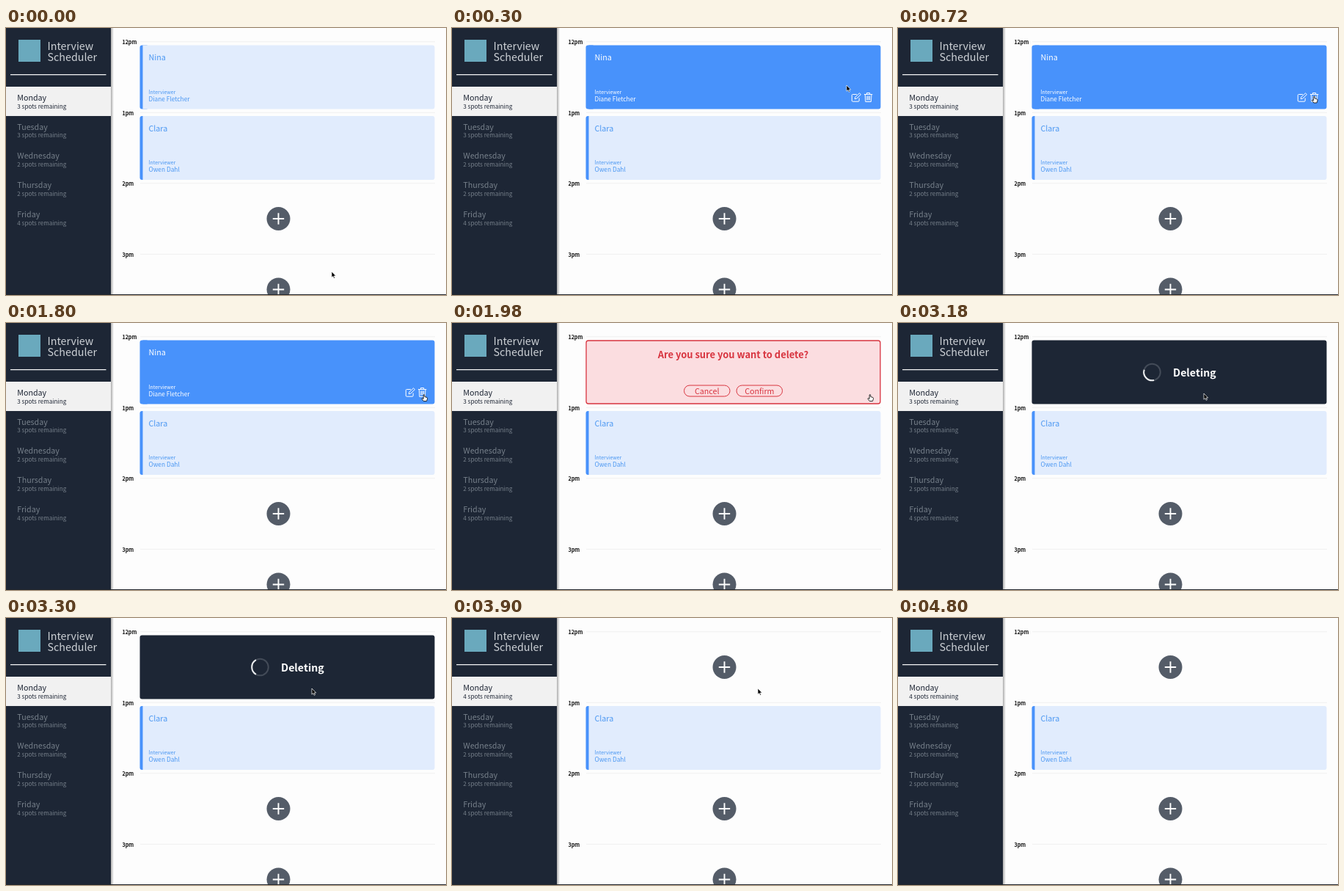
Write an HTML page that moves like this. It is 600x364 px and loops after 4.98 s.

```html
<!DOCTYPE html>
<html lang="en">
<head>
<meta charset="utf-8">
<title>Interview Scheduler</title>
<style>
html, body { margin: 0; height: 100%; overflow: hidden; background: #fdfdfd; }
svg { display: block; width: 600px; height: 364px; }
text { font-family: "Noto Sans CJK JP", "Noto Sans CJK SC", "Noto Sans", sans-serif; font-size: 10.7px; }
.logo { font-size: 14.3px; font-weight: 300; fill: #cdd1d6; }
.day { fill: #77808b; }
.active { fill: #1c2433; }
.spots { font-size: 8.1px; font-weight: 300; }
.time { font-size: 7.2px; font-weight: 700; fill: #111; }
.label { font-size: 6.9px; font-weight: 300; }
.person { font-size: 8.35px; }
.card { fill: #4a97f2; }
.card .bg { fill: #e1ecfd; }
.card .icons { display: none; fill: none; stroke: #fff; }
.hover { fill: #fff; }
.hover .bg { fill: #4892fb; }
.hover .icons { display: inline; }
.confirm { fill: #d8343f; text-anchor: middle; }
.confirm rect { stroke: #d8343f; fill: #fbdde0; }
.question { font-size: 12.9px; font-weight: 700; }
.deleting { font-size: 14.2px; font-weight: 700; fill: #fff; }
</style>
</head>
<body>
<svg viewBox="0 0 600 364">
  <defs>
    <linearGradient id="shade">
      <stop stop-color="#000" stop-opacity=".32"/>
      <stop offset="1" stop-color="#000" stop-opacity="0"/>
    </linearGradient>
    <g id="plus">
      <circle r="16" fill="#545c68"/>
      <path d="M-7.7 0H7.7M0-7.7V7.7" stroke="#fff" stroke-width="1.9"/>
    </g>
  </defs>
  <rect width="600" height="364" fill="#fdfdfd"/>
  <rect x="143" width="4" height="364" fill="url(#shade)"/>
  <rect width="143" height="364" fill="#1d2635"/>
  <rect x="17" y="16" width="30" height="30" fill="#6aa9bd"/>
  <text class="logo" x="56.5" y="30.3">Interview</text>
  <text class="logo" x="56.5" y="44.8">Scheduler</text>
  <path d="M6 63.6H136.5" stroke="#f4f5f6" stroke-width="1.3"/>
  <rect y="80" width="143" height="40" fill="#f1f1f1"/>
  <g id="days"></g>
  <g id="hours"></g>
  <g id="cards"></g>

  <g id="confirm" class="confirm">
    <rect x="183" y="24" width="401" height="86" rx="3" stroke-width="1.3"/>
    <text class="question" x="383.5" y="48.3">Are you sure you want to delete?</text>
    <rect x="316.5" y="85" width="62.5" height="15" rx="7.5"/>
    <rect x="388" y="85" width="62.5" height="15" rx="7.5"/>
    <text x="347.7" y="96.6">Cancel</text>
    <text x="419.3" y="96.6">Confirm</text>
  </g>

  <g id="deleting">
    <rect x="182.5" y="23.5" width="402" height="87" rx="3" fill="#1d2635"/>
    <g fill="none" stroke-width="2" transform="translate(346.5 67)">
      <circle r="11.3" stroke="#434b58"/>
      <path id="arc" d="M-5.6 9.8A11.3 11.3 0 0 1-5.6-9.8" stroke="#eceef0"/>
    </g>
    <text class="deleting" x="375" y="72.7">Deleting</text>
  </g>

  <use id="empty" href="#plus" x="371.5" y="67"/>
  <rect y="363" width="600" height="1" fill="#22262c"/>
  <g id="cursor" stroke-linejoin="round">
    <path id="arrow" d="M0 0V8.2L1.9 6.5L3.2 9.3L4.5 8.7L3.2 6H5.8Z" fill="#000" stroke="#fff" stroke-width=".7"/>
    <path id="hand" d="M-.8.5Q0-.6.8.5V3L4 4Q4.8 4.4 4.5 6L3.6 9H-.6L-3 5.8Q-2.8 4.6-1.7 5.2L-.8 6Z" fill="#fff" stroke="#000" stroke-width=".8"/>
  </g>
</svg>
<script>
const LOOP = 4980, STEP = 60;
const ASK = 1980, DELETE = 2880, DONE = 3900, LEAVE = 4560;
const ROW = 96.5;
const $ = id => document.getElementById(id);
const show = (id, on) => $(id).style.display = on ? "" : "none";

const days = [["Monday", 3], ["Tuesday", 3], ["Wednesday", 2], ["Thursday", 2], ["Friday", 4]];
$("days").innerHTML = days.map(([day, spots], i) => `
  <g class="day ${i ? "" : "active"}" transform="translate(15.3 ${98.8 + 39.8 * i})">
    <text>${day}</text><text class="spots" y="10.8">${spots} spots remaining</text>
  </g>`).join("");
const mondaySpots = document.querySelector(".spots");

$("hours").innerHTML = [12, 1, 2, 3].map((hour, i) => `
  <g transform="translate(0 ${ROW * i})">
    <path d="M183 18.8H585" stroke="#f0f0f0"/>
    <text class="time" x="158.4" y="22">${hour}pm</text>
    ${i > 1 ? '<use href="#plus" x="371.5" y="67"/>' : ""}
  </g>`).join("");

$("cards").innerHTML = [["Nina", "Diane Fletcher"], ["Clara", "Owen Dahl"]].map(([name, host], i) => `
  <g class="card" id="card${i}" transform="translate(0 ${ROW * i})">
    <rect x="182.5" y="23.5" width="12" height="87" rx="3" fill="#4892fb"/>
    <path class="bg" d="M186.5 23.5H581.5a3 3 0 0 1 3 3V107.5a3 3 0 0 1-3 3H186.5Z"/>
    <text x="194.5" y="44.2">${name}</text>
    <text class="label" x="194.5" y="89.5">Interviewer</text>
    <text class="person" x="194.5" y="99.6">${host}</text>
    <g class="icons">
      <path d="M552 90.5H546.5Q545.3 90.5 545.3 91.7V99Q545.3 100.2 546.5 100.2H554Q555.2 100.2 555.2 99V95.5M549.3 96.8L549.8 94.3L555.6 88.8L557.5 90.7L551.8 96.2Z"/>
      <path d="M562 90.5H573.3M565.6 90.3V88.5H569.7V90.3M563.3 90.5L563.9 100.5H571.4L572 90.5M565.9 92.6V98.5M567.7 92.6V98.5M569.5 92.6V98.5"/>
    </g>
  </g>`).join("");

// Pointer path: time, x, y
const path = [
  [60, 444, 332], [300, 538, 78], [480, 538, 78], [720, 567.5, 93], [900, 570, 97.5],
  [2280, 570, 97.5], [2520, 441, 96], [2580, 441, 96], [2820, 417, 96], [4320, 417, 96], [4560, 440, 67]
];

function pointer(t) {
  const i = path.findIndex(p => p[0] >= t);
  if (i < 1) return (i ? path.at(-1) : path[0]).slice(1);
  const [t0, x0, y0] = path[i - 1], [t1, x1, y1] = path[i];
  const u = (t - t0) / (t1 - t0), k = u * u * (3 - 2 * u);
  return [x0 + (x1 - x0) * k, y0 + (y1 - y0) * k];
}

function draw(now) {
  const t = Math.floor(now % LOOP / STEP) * STEP;
  const [x, y] = pointer(t);
  [0, 1].forEach(i => {
    const top = 23.5 + ROW * i;
    $("card" + i).classList.toggle("hover", x > 182 && x < 585 && y > top && y < top + 87);
  });
  show("card0", t < ASK);
  show("confirm", t >= ASK && t < DELETE);
  show("deleting", t >= DELETE && t < DONE);
  show("empty", t >= DONE);
  mondaySpots.textContent = `${t < DONE ? 3 : 4} spots remaining`;
  $("arc").setAttribute("transform", `rotate(${(t - 3300) * 0.36})`);

  const onTrash = t <= ASK && x > 560 && y > 86 && y < 102;
  show("hand", onTrash);
  show("arrow", !onTrash);
  show("cursor", t < LEAVE);
  $("cursor").setAttribute("transform", `translate(${x} ${y})`);
  requestAnimationFrame(draw);
}
requestAnimationFrame(draw);
</script>
</body>
</html>
```
